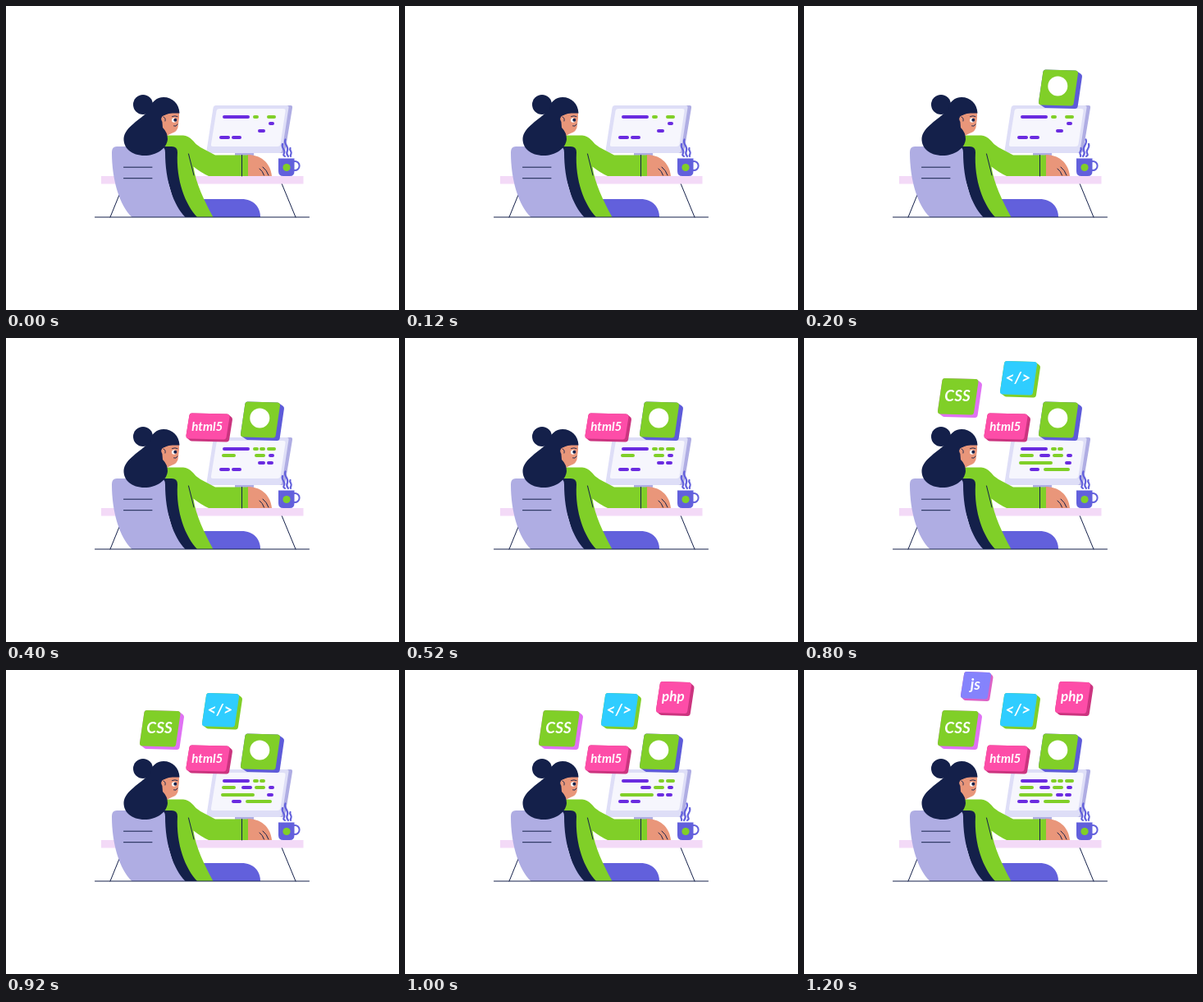
These frames come from a looping animation (479 px wide and 370 px high, 1.4 s). An HTML page:

```html
<!DOCTYPE html>
<html lang="en">
<head>
<meta charset="utf-8">
<title>Coding at a desk</title>
<style>
  html, body { margin: 0; width: 100%; height: 100%; overflow: hidden; background: #fff; }
  svg { display: block; width: 100%; height: 100%; }
  text { font-family: Lato, "Open Sans", sans-serif; font-weight: 700; font-style: italic; fill: #fff; text-anchor: middle; }
  .ink { fill: none; stroke: #14204a; stroke-linecap: round; }
  .navy { fill: #14204a; }
  .green { fill: #80cf28; }
  .lilac { fill: #afade3; }
  .skin { fill: #e9967a; }
  .blue { fill: #6260dc; }
</style>
</head>
<body>
<svg viewBox="0 0 479 370">
  <!-- monitor -->
  <path class="lilac" d="M279 176H302V207H279ZM342 121H347Q349.500 121 349 124L340.500 175Q340 179 336 179H330Z"/>
  <path fill="#dedef7" d="M256 121H342Q345 121 344.500 124L336.500 176Q336 179 333 179H247Q244 179 244.500 176L252.500 124Q253 121 256 121Z"/>
  <path fill="#f6f6fd" d="M260 125H338Q341 125 340.500 128L334.500 168Q334 171 331 171H252Q249.500 171 250 168L256.500 128Q257 125 260 125Z"/>
  <g id="code" stroke-width="4" stroke-linecap="round"></g>

  <!-- desk -->
  <path class="ink" d="M138 230L127 257M336 216L353 257"/>
  <path fill="#f3daf7" d="M116 207H362.500V216.500H116Z"/>

  <!-- mug -->
  <g id="steam" fill="none" stroke="#6260dc" stroke-width="2.200" stroke-linecap="round">
    <path d="M340.500 162.500C338 168 345 171 343 176S343 181 344 183M346.500 173C345 176 349 177 347.500 180S347 182 347 183M337 168C335 173 341 175 339 179S340 182 340 183"/>
  </g>
  <circle cx="352" cy="194.500" r="5.600" fill="none" stroke="#6260dc" stroke-width="2"/>
  <path class="blue" d="M332 185.500H351.500V201Q351.500 207 346 207H338Q332 207 332 201Z"/>
  <circle class="green" cx="342" cy="196.500" r="4.600"/>

  <!-- body -->
  <path class="blue" d="M232 235H287C302 235 310 245 310 257H232Z"/>
  <path class="skin" d="M294 181C310 181 322 190 324 207H294Z"/>
  <path class="ink" d="M309 198Q313 201 314.500 206M313 196Q318 200 320 206"/>
  <path class="green" d="M194 157.500H216Q222 157.500 228 164Q231 168.500 237 172L255 181.500H295V207H247Q238 203 228.500 195.500C231 215 242 238 252.500 257H215L194 175Z"/>
  <path class="ink" d="M222.500 180L229 206M287.500 181.500V207"/>

  <!-- chair -->
  <path class="navy" d="M185 171H202Q209 171 209 178C207 213 219 242 233 257H210Z"/>
  <path class="lilac" d="M135 171H188Q194 171 194 178C194 213 204 242 218.500 257H153.500C138 242 129 211 129 178Q129 171 135 171Z"/>
  <path class="ink" d="M143.500 196.200H178M143.500 209.700H178M108.500 257H369.500"/>

  <!-- head -->
  <path class="skin" d="M187 129H211V136L209.500 148Q208 153 203 154.500Q199 156 196 158L187 165Z"/>
  <circle class="navy" cx="167" cy="120" r="12"/>
  <path class="navy" d="M176 126C176 117 184 111 192 111C203 111 211 119 211.500 130.500H203Q193 131 190 136L191 148Q197 154 197 162C196 174 183 182 169 182C153 182 143 173 143.500 161C145 147 163 139 176 126Z"/>
  <circle class="skin" cx="193.500" cy="137.500" r="4.300"/>
  <path class="ink" stroke-width=".9" d="M192 135Q195 136 194 140M202.500 134.500Q206 133 209 134.500M204.500 146Q207.500 147.500 209 144"/>
  <circle cx="204.800" cy="139" r="2.800" fill="#fff"/>
  <circle class="navy" cx="206.300" cy="138.800" r="2"/>

  <g id="tiles"></g>
</svg>
<script>
const STEP = 200, STEPS = 7;
const PURPLE = '#6a2be0', GREEN = '#80cf28', PINK = '#fd4da8', ROSE = '#cb347f';
const $ = id => document.getElementById(id);

// Code bars: [left, right, centre y, colour, steps in which shown]
const bars = [
  [264, 297, 135, PURPLE, '0123456'],
  [301, 308, 135, GREEN, '012346'],
  [309, 316, 135, GREEN, '23456'],
  [318, 329, 135, GREEN, '01256'],
  [263, 280, 143, GREEN, '246'],
  [287, 300, 143, PURPLE, '3456'],
  [303, 316, 143, GREEN, '23456'],
  [320, 327, 143, PURPLE, '0123456'],
  [262, 303, 152, GREEN, '3456'],
  [307, 316, 152, PURPLE, '012356'],
  [318, 326, 152, PURPLE, '23456'],
  [260, 273, 160, PURPLE, '012356'],
  [275, 287, 160, PURPLE, '0123456'],
  [292, 324, 160, GREEN, '46']
];

$('code').innerHTML = bars.map(([l, r, y, c]) =>
  `<path stroke="${c}" d="M${l + 2} ${y}H${r - 2}"/>`).join('');

// Tiles in order of arrival; x, y, w, h bound the slanted front face
const tiles = [
  { x: 286, y: 77.5, w: 48, h: 44, dx: 5, dy: 3.5, face: GREEN, side: '#5d5bd9' },
  { x: 219.5, y: 91.5, w: 53, h: 32, dx: 3.5, dy: 3, face: PINK, side: ROSE, label: 'html5', size: 15.2, base: 113 },
  { x: 239, y: 28, w: 45, h: 41.5, dx: 4, dy: 3, face: '#2fcdff', side: GREEN, label: '&lt;/&gt;', size: 19.5, base: 54.5 },
  { x: 163, y: 49, w: 49.5, h: 44.5, dx: 4.5, dy: 3.5, face: GREEN, side: '#e072f3', label: 'CSS', size: 19, base: 77 },
  { x: 306, y: 14, w: 43, h: 39, dx: 3.5, dy: 3, face: PINK, side: ROSE, label: 'php', size: 17, base: 37.5 },
  { x: 191, y: 2, w: 37, h: 33.5, dx: 2.5, dy: 2.5, face: '#8583fc', side: '#dc62c5', label: 'js', size: 19, base: 24 }
];

const shape = (pts, color) =>
  `<polygon points="${pts.join(' ')}" fill="${color}" stroke="${color}" stroke-width="7" stroke-linejoin="round"/>`;

function tile({ x, y, w, h, dx, dy, face, side, label, size, base }) {
  const lean = h * .12, r = 3.5;
  const tl = [x + lean + r, y + r], tr = [x + w - r, y + 1 + r];
  const br = [x + w - lean - r, y + h - r], bl = [x + r, y + h - 1 - r];
  const shift = ([a, b]) => [a + dx, b + dy];
  const cx = x + w / 2 - .7;
  const mark = label
    ? `<text x="${cx}" y="${base}" font-size="${size}">${label}</text>`
    : `<circle cx="${cx}" cy="${y + h / 2 - 2}" r="12" fill="#fff"/>`;
  return `<g>${shape([tl, tr, shift(tr), shift(br), shift(bl), bl], side)}${shape([tl, tr, br, bl], face)}${mark}</g>`;
}

$('tiles').innerHTML = tiles.map(tile).join('');

const show = (el, on) => el.setAttribute('visibility', on ? 'visible' : 'hidden');

function draw() {
  const step = Math.floor(performance.now() / STEP) % STEPS;
  [...$('code').children].forEach((el, i) => show(el, bars[i][4].includes(step)));
  [...$('tiles').children].forEach((el, i) => show(el, i < step));
  $('steam').setAttribute('transform', step % 2 ? 'translate(684 0) scale(-1 1)' : '');
  requestAnimationFrame(draw);
}
draw();
</script>
</body>
</html>
```
